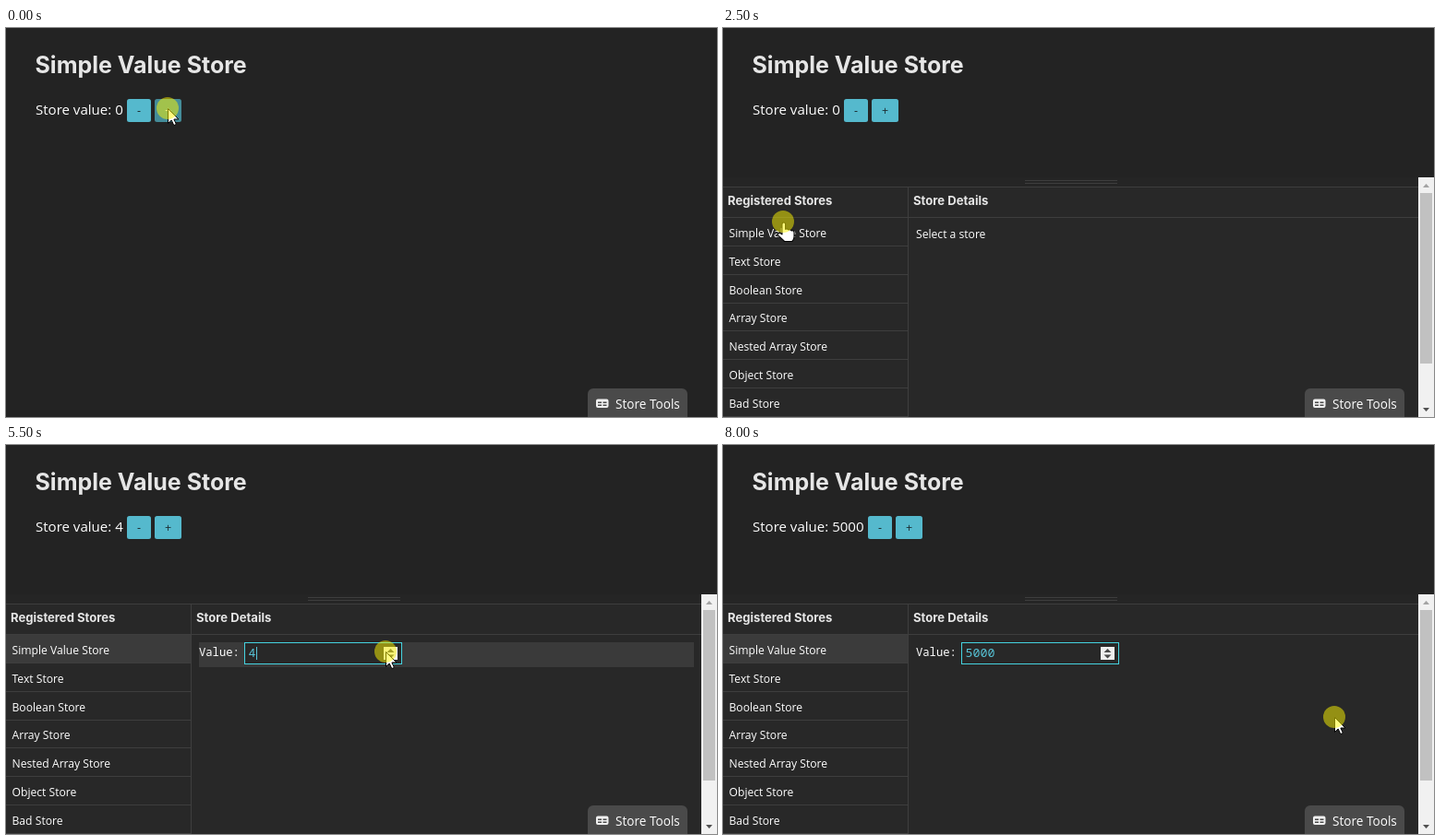
Recreate the animation shown at these times as an HTML page. Size 770 by 422 pixels, loop 8500 ms.

```html
<!DOCTYPE html>
<html lang="en">
<head>
<meta charset="utf-8">
<title>Simple Value Store</title>
<style>
  html, body { margin: 0; width: 100%; height: 100%; overflow: hidden; background: #232323; }
  svg { display: block; width: 770px; height: 422px; }
  text { font-family: "Open Sans", "Noto Sans", sans-serif; fill: #fff; white-space: pre; }
  .title { font: 700 25px Inter, sans-serif; fill: #e6e6e6; }
  .head { font: 700 13.1px Inter, sans-serif; fill: #e6e6e6; }
  .body { font-size: 15.05px; }
  .item { font-size: 12.15px; }
  .mono { font: 500 12.2px "Noto Sans Mono", monospace; }
  .field { font: 400 13.33px "Noto Sans Mono", monospace; fill: #57c3d6; }
  .btn rect { fill: #55b9cd; }
  .btn text { font-size: 12.5px; text-anchor: middle; fill: #1c2b2f; }
  .btn.over rect { fill: #448c99; }
  .btn.over text { fill: #f4f4f4; }
  .tools rect { fill: #4a4a4a; }
  .tools.over rect { fill: #5a5a5a; }
  .line { stroke: #3e3e3e; fill: none; }
  .hide { display: none; }
  .pointer { fill: #fff; stroke: #000; stroke-linejoin: round; }
</style>
</head>
<body>
<svg viewBox="0 0 770 422">
  <rect width="770" height="422" fill="#232323"/>
  <text class="title" x="31.5" y="49">Simple Value Store</text>
  <text class="body" id="label" x="32" y="94"></text>
  <g id="buttons">
    <g class="btn" id="minus">
      <rect x="131" y="77" width="26" height="25" rx="2.5"/>
      <text x="144" y="94">-</text>
    </g>
    <g class="btn" id="plus">
      <rect x="161" y="77" width="29" height="25" rx="2.5"/>
      <text x="175.5" y="94">+</text>
    </g>
  </g>

  <g id="panel">
    <rect y="162" width="770" height="260" fill="#282828"/>
    <rect y="162" width="753" height="10" fill="#252525"/>
    <rect id="picked" y="206" width="200" height="30" fill="#3b3b3b"/>
    <path class="line" d="M327 165.5h100M327 168.5h100M0 172.5h753M0 205.5h753M200.5 172v250"/>
    <text class="head" x="5" y="192">Registered Stores</text>
    <text class="head" x="206" y="192">Store Details</text>
    <g id="list"></g>
    <text class="item" id="hint" x="209" y="228">Select a store</text>
    <g id="details">
      <rect id="row" x="209" y="214" width="536" height="27" fill="#3a3a3a"/>
      <text class="mono" x="209" y="229">Value:</text>
      <rect x="258.5" y="214.5" width="170" height="23" fill="#282828" stroke="#45d3e0"/>
      <text class="field" id="field" x="262.5" y="230"></text>
      <rect id="caret" y="219" width="1" height="14" fill="#57c3d6"/>
      <rect x="409" y="219" width="15" height="14" fill="#efefef"/>
      <path d="M412.5 225l4-4 4 4zM412.5 227.5l4 4 4-4z" fill="#4a4a4a"/>
    </g>
    <rect x="753" y="162" width="17" height="260" fill="#f1f1f1"/>
    <rect x="755" y="179" width="13" height="185" fill="#c1c1c1"/>
    <path d="M758 173l3.5-4 3.5 4z" fill="#a3a3a3"/>
    <path d="M758 412l3.5 4 3.5-4z" fill="#505050"/>
  </g>

  <g class="tools" id="tools">
    <rect x="630" y="391" width="108" height="40" rx="6"/>
    <path d="M641 402.5h9.500a2 2 0 0 1 2 2v5.500a2 2 0 0 1-2 2h-9.500a2 2 0 0 1-2-2v-5.500a2 2 0 0 1 2-2zM641 405.5v1.500h4v-1.500zM646.5 405.5v1.500h4v-1.500zM641 408.500v1.500h4v-1.500zM646.5 408.500v1.500h4v-1.500z" fill="#f0f0f0" fill-rule="evenodd"/>
    <text x="660" y="413" font-size="13.6">Store Tools</text>
  </g>

  <g id="mouse">
    <path class="pointer" id="arrow" d="M.5.5v16l3.7-3.5 2.6 5.6 2.6-1.2-2.5-5.4h5z"/>
    <path class="pointer" id="hand" transform="translate(-.5 .5) scale(1.12)" d="M-.5 11V2.2Q-.3.5 1.2.5T2.8 2.2V7q1.8-.9 3 .6 1.8-.8 2.8.8 2.4-.6 2.6 1.8v4q0 2.3-1.7 4v.6h-8v-.6L-4.2 13q-.9-1.8.7-2.4Q-2.3 10.3-.5 12z"/>
    <path id="beam" fill="none" stroke="#d8d8d8" d="M-3-7.500h2.200l1.300 1 1.300-1H4M.5-6.500v13M-3 7.500h2.200l1.300-1 1.300 1H4"/>
  </g>
  <circle id="click" r="12" fill="#fff800" fill-opacity=".5"/>
</svg>
<script>
  const $ = id => document.getElementById(id);
  const show = (id, on) => $(id).classList.toggle('hide', !on);
  const over = (id, on) => $(id).classList.toggle('over', on);
  const STEP = 500, LOOP = 8500;

  const names = ['Simple Value', 'Text', 'Boolean', 'Array', 'Nested Array', 'Object', 'Bad'];
  $('list').innerHTML = names.map((name, i) => {
    const y = Math.round(206 + i * 30.8);
    return `<text class="item" x="6.5" y="${y + 21}">${name} Store</text>` +
      `<path class="line" d="M0 ${y + 30.5}h200"/>`;
  }).join('');

  // Where the pointer rests: start step, shape, x, y, hovered part
  const stops = [
    [0, 'arrow', 175, 87, 'plus'],
    [2, 'arrow', 151, 90, 'minus'],
    [4, 'hand', 689, 405, 'tools'],
    [5, 'hand', 65, 210],
    [6, 'beam', 274, 219],
    [7, 'arrow', 411, 224],
    [12, 'beam', 367, 227],
    [16, 'arrow', 662, 295]
  ];
  const values = [0, 1, 2, 1, 0, 0, 0, 1, 1, 2, 3, 4, 5, 50, 50, 5000, 5000];
  const clicks = [0, 2, 4, 5, 6, 7, 9, 11, 16];
  const offset = { arrow: 0, hand: 0, beam: 2 };

  function draw(step) {
    const [, shape, x, y, part] = stops.filter(s => s[0] <= step).pop();
    const value = String(values[step]);
    const open = step >= 5, chosen = step >= 6, inside = step < 16;

    $('label').textContent = 'Store value: ' + value;
    $('buttons').setAttribute('transform', `translate(${Math.round((value.length - 1) * 8.67)})`);
    for (const id of ['plus', 'minus', 'tools']) over(id, id === part);

    show('panel', open);
    show('picked', chosen);
    show('hint', !chosen);
    show('details', chosen);
    show('row', inside);
    show('caret', inside);
    $('field').textContent = value;
    $('caret').setAttribute('x', 263 + value.length * 8);

    for (const id in offset) show(id, id === shape);
    const d = offset[shape];
    $('mouse').setAttribute('transform', `translate(${x + d} ${y + d})`);
    show('click', clicks.includes(step));
    $('click').setAttribute('cx', x);
    $('click').setAttribute('cy', y);
  }

  let start = null, last = -1;
  function tick(now) {
    if (start === null) start = now;
    const step = Math.floor((now - start) % LOOP / STEP);
    if (step !== last) draw(last = step);
    requestAnimationFrame(tick);
  }
  draw(0);
  requestAnimationFrame(tick);
</script>
</body>
</html>
```
